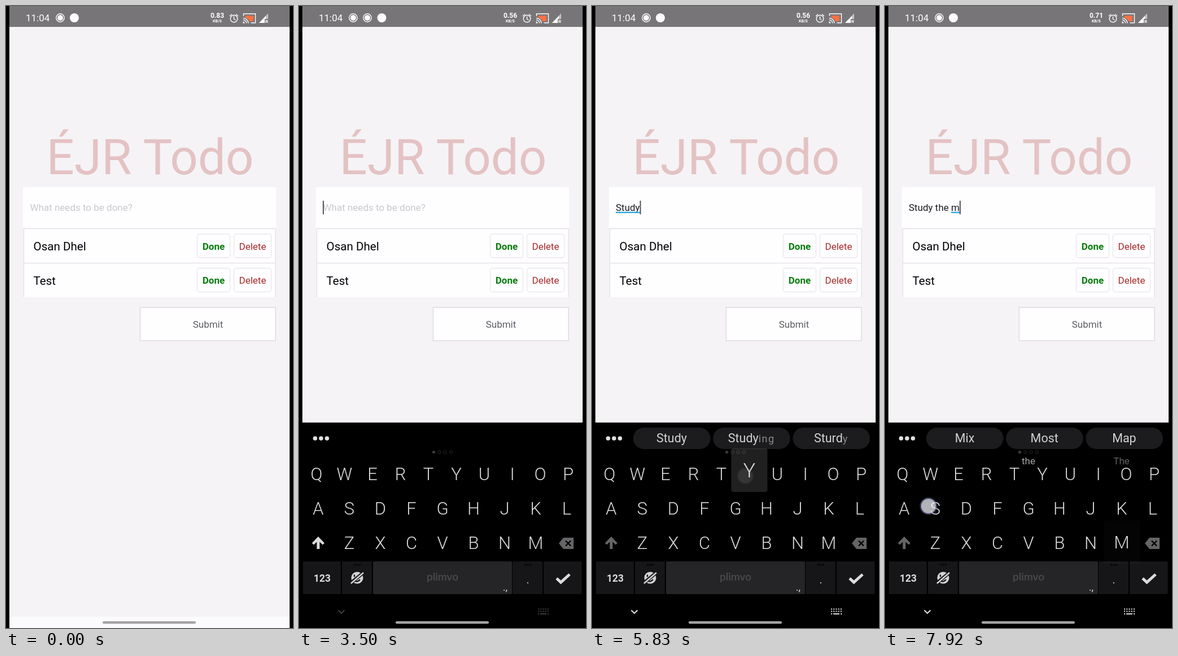
Animation of 508x1102 px, one loop 8 s. Source, as an HTML page:

```html
<!DOCTYPE html>
<html lang="en">
<head>
<meta charset="utf-8">
<title>Todo typing</title>
<style>
  html, body { margin: 0; width: 100%; height: 100%; overflow: hidden; background: #000; }
  svg { display: block; width: 508px; height: 1102px; font-family: Roboto, sans-serif; }
  text { white-space: pre; }
  .mid { text-anchor: middle; }
  .f17 { font-size: 17px; }
  .item { font-size: 20.6px; }
  .btn { fill: #fefdff; stroke: #e9e7eb; stroke-width: 1.3; }
  .done { font-weight: 700; fill: #087c0c; }
  .del { fill: #a52a2a; }
  .key { font-size: 31px; font-weight: 300; fill: #dcdcdc; }
  .pill { font-size: 21.5px; fill: #d2d2d4; }
  .rest { font-size: 18px; letter-spacing: 1.5px; fill: #8b8a8d; }
  .line { fill: none; stroke: #fff; stroke-width: 1.4; }
</style>
</head>
<body>
<svg viewBox="0 0 508 1102">
  <rect width="508" height="1102"/>
  <rect x="6" width="496" height="1102" fill="#f5f3f6"/>
  <rect x="6" width="496" height="37" fill="#777578"/>
  <rect x="6" y="1082" width="496" height="20" fill="#fbfafc"/>

  <g fill="#fff">
    <text x="35" y="27" font-size="17">11:04</text>
    <g id="rec"><circle class="line" cx="96" cy="21" r="7.2"/><circle cx="96" cy="21" r="5"/></g>
    <use id="rec2" href="#rec" x="25"/>
    <circle id="app" cx="121" cy="21" r="8"/>
    <text id="speed" class="mid" x="374" y="21" font-size="12" font-weight="700"></text>
    <text class="mid" x="374" y="28.5" font-size="7" font-weight="700">KB/S</text>
    <g class="line"><circle cx="403.5" cy="22.5" r="6.3"/><path d="M403.5 18.5V23l3 2M396 18l4-3.5M411 18l-4-3.5"/></g>
    <path d="M424 17h14v10h-7q-2-5-7-6z" fill="#ff7043"/>
    <path class="line" d="M420.500 18v-4.300h21v16h-8M420 21.500a9 9 0 0 1 9 9M420 24.800a5.700 5.700 0 0 1 5.700 5.700" stroke-width="1.6"/>
    <path d="M419.500 27.500a3 3 0 0 1 3 3h-3z"/>
    <path d="M448 30L464 13V23H458V30z" opacity=".55"/>
    <path d="M448 30L460 17.500V23H458V30z"/>
    <text x="459" y="30" font-size="8" font-weight="700">R</text>
  </g>

  <text class="mid" x="255" y="298" font-size="87" fill="#e4c2c3">ÉJR Todo</text>

  <rect x="30" y="321" width="448" height="72" fill="#fefdff"/>
  <text id="hint" class="f17" x="42.500" y="363" fill="#c9c8ca">What needs to be done?</text>
  <text id="typed" class="f17" x="42" y="363" fill="#1c1c1c"></text>
  <rect id="under" y="364.500" height="2.500" fill="#35abe2"/>
  <rect id="caret" y="345" width="2" height="24" fill="#555"/>

  <rect x="31" y="394" width="446" height="122" fill="#fefdff"/>
  <path d="M31.500 516V394.500H477V516M31 455.500H477" fill="none" stroke="#e6e4e8" stroke-width="1.5"/>
  <text class="item" x="48.500" y="433">Osan Dhel</text>
  <text class="item" x="48.500" y="494">Test</text>
  <g id="buttons" class="f17 mid">
    <rect class="btn" x="338.500" y="404" width="58" height="42" rx="4"/>
    <text class="done" x="367.500" y="431.500">Done</text>
    <rect class="btn" x="403.500" y="404" width="66" height="42" rx="4"/>
    <text class="del" x="436.500" y="431.500">Delete</text>
  </g>
  <use href="#buttons" y="60.500"/>
  <rect x="237.500" y="534" width="239.500" height="59" fill="#fefdff" stroke="#dedce0" stroke-width="1.5"/>
  <text class="f17 mid" x="357.500" y="570" fill="#5f5d61">Submit</text>

  <g id="board">
    <rect y="738" width="508" height="364"/>
    <g fill="#e0e0e0"><circle cx="28.500" cy="766" r="3.800"/><circle cx="39" cy="766" r="3.800"/><circle cx="49.500" cy="766" r="3.800"/></g>
    <g id="pills"></g>
    <g fill="none" stroke="#2c2b2d">
      <circle cx="238.500" cy="790.500" r="2.500" fill="#3c3b3d"/><circle cx="248.500" cy="790.500" r="2.700"/>
      <circle cx="258.500" cy="790.500" r="2.700"/><circle cx="269" cy="790.500" r="2.700"/>
    </g>
    <rect id="row" x="6" y="861" width="496" height="60" fill="#fff"/>
    <path id="shift" d="M34 940L45 951.500L42 954.500L36.500 949.500V962H31.500V949.500L26 954.500L23 951.500Z"/>
    <path d="M460 952L468 942H486V962H468Z" fill="#656466"/>
    <path d="M472 947.500l9 9M481 947.500l-9 9" stroke="#000" stroke-width="2.400"/>
    <g fill="#161517">
      <rect x="7" y="984" width="67" height="58" rx="2"/><rect x="76" y="984" width="53" height="58" rx="2"/>
      <rect x="378" y="984" width="53" height="58" rx="2"/><rect x="433" y="984" width="67.500" height="58" rx="2"/>
      <rect x="131" y="984" width="246" height="58" rx="2" fill="#252427"/>
    </g>
    <rect id="space" x="131" y="984" width="246" height="58" rx="2" fill="#fff"/>
    <g id="more" fill="#060606"><circle cx="98.500" cy="990" r="1.800"/><circle cx="103" cy="990" r="1.800"/><circle cx="107.500" cy="990" r="1.800"/></g>
    <use href="#more" x="302"/>
    <g class="mid" fill="#dcdcdc">
      <text x="41" y="1020" font-size="17.500" font-weight="700">123</text>
      <text x="254" y="1018" font-size="19" font-weight="600" fill="#4b4a4d" font-family="Lato, sans-serif">plimvo</text>
      <text x="365" y="1036" font-size="18">.,</text>
      <text x="405" y="1023" font-size="19">.</text>
    </g>
    <path d="M456 1014l7.500 7L479 1007" fill="none" stroke="#dcdcdc" stroke-width="5"/>
    <circle cx="103" cy="1013" r="10.500" fill="#d4d4d4"/>
    <g fill="none" stroke="#161517" stroke-width="2.300">
      <path d="M98 1007.500v4M107 1009v4M99 1019q5 2 9-3"/>
      <path d="M92 1022L114 1004" stroke-width="6"/>
      <path d="M92 1023L114 1004" stroke="#d4d4d4" stroke-width="2.600"/>
    </g>
    <g id="nav">
      <path d="M69.500 1070.500l5.500 5.500l5.500-5.500" fill="none" stroke="#eee" stroke-width="1.800"/>
      <path d="M423 1068.500h19M423 1072.500h19" stroke="#ddd" stroke-width="2.200" stroke-dasharray="2.200 2"/>
      <path d="M423 1077h2.200M427 1077h11M440 1077h2.200" stroke="#ddd" stroke-width="2.200"/>
    </g>
    <g id="keys"></g>
    <g id="fix" class="f17 mid"><text x="254" y="812" fill="#b4b4b6"></text><text x="418.500" y="812" fill="#717073"></text></g>
  </g>
  <rect x="171" y="1090" width="165" height="4.500" rx="2.200" fill="#a5a3a6"/>
  <g id="touch">
    <circle r="16" fill="#8f8fd0" opacity=".22"/>
    <circle r="13" fill="#fff" fill-opacity=".66" stroke="#8c96be" stroke-opacity=".55" stroke-width="2"/>
  </g>
</svg>
<script>
const LOOP = 8000, STEP = 1000 / 12;
const $ = id => document.getElementById(id);
const clamp = v => Math.max(0, Math.min(1, v));
const ramp = (t, from, span) => clamp((t - from) / span);
const show = (el, alpha) => el.setAttribute('opacity', alpha);

// Keyboard letters
const keys = {};
[['QWERTYUIOP', 31, 49.5, 828.5], ['ASDFGHJKL', 34, 55, 890], ['ZXCVBNM', 89, 55, 951]].forEach(([row, x0, gap, y]) =>
  [...row].forEach((ch, i) => {
    const x = x0 + gap * i;
    $('keys').insertAdjacentHTML('beforeend',
      `<g><rect x="-32" y="-38.5" width="64" height="77" rx="4" fill="#fff"/><text class="key mid" y="11">${ch}</text></g>`);
    keys[ch] = { x, y, el: $('keys').lastChild };
  }));
keys[' '] = { x: 250, y: 1003 };

// Finger contacts: [key or point, down, up]
const taps = [
  [{ x: 88, y: 353 }, 3070, 3200],
  ['S', 4500, 4620], ['T', 4790, 4890], ['U', 5080, 5200], ['D', 5390, 5480], ['Y', 5630, 5730],
  [' ', 5960, 6080], ['T', 6230, 6380], ['H', 6450, 6550], ['E', 6640, 6800], [' ', 7300, 7420],
  ['M', 7540, 7670], [{ x: 84, y: 882 }, 7860, 8100]
].map(([k, down, up]) => ({ ...(keys[k] || k), down, up, key: k }));

// Field states: [time, text, start of current word, suggestions, matched letters]
const states = [
  [-500, '', 0, ''], [3300, '', 0, ''],
  [4560, 'S', 0, 'So She Some', 1], [4850, 'St', 0, 'Still Start Stay', 2],
  [5140, 'Stu', 0, 'Stupid Stuff Study', 3], [5450, 'Stud', 0, 'Study Student Studied', 4],
  [5690, 'Study', 0, 'Study Studying Sturdy', 5], [6030, 'Study ', 6, 'and for Studying'],
  [6290, 'Study t', 6, 'and for Studying'], [6510, 'Study th', 6, 'that the this'],
  [6700, 'Study the', 6, 'that the then'], [7370, 'Study the ', 10, 'same first next'],
  [7600, 'Study the m', 10, 'Mix Most Map']
];
const fixes = [[6030, 'study', 'sturdy'], [7370, 'the', 'The']];

const pen = document.createElement('canvas').getContext('2d');
const width = s => { pen.font = '17px Roboto, sans-serif'; return pen.measureText(s).width; };

const pill = (word, i, n) => {
  const body = n ? `${word.slice(0, n)}<tspan class="rest">${word.slice(n)}</tspan>` : word;
  return `<rect x="${73 + 141.2 * i}" y="747" width="136.500" height="38" rx="19" fill="#1c1b1d"/>
    <text class="pill mid" x="${141 + 141.2 * i}" y="773">${body}</text>`;
};

let shown;
function drawField(t) {
  const state = states.filter(s => s[0] <= t).pop();
  const [since, text, start, words, match] = state;
  if (state !== shown) {
    shown = state;
    $('typed').textContent = text;
    $('pills').innerHTML = words ? words.split(' ').map((w, i) => pill(w, i, match)).join('') : '';
  }
  const from = 42 + width(text.slice(0, start)), to = 42 + width(text);
  show($('hint'), text ? 0 : 1);
  $('under').setAttribute('x', from);
  $('under').setAttribute('width', to - from);
  $('caret').setAttribute('x', to);
  show($('caret'), (t - since) % 1000 < 500 ? 1 : 0);
  $('shift').setAttribute('fill', text ? '#656466' : '#dcdcdc');
}

function drawKeys(t) {
  const lift = {};
  let finger = null, alpha = 0;
  for (const tap of taps) {
    const rise = ramp(t, tap.down + 20, 50);
    const p = rise * (1 - ramp(t, tap.up, 400)) ** 3;
    lift[tap.key] = Math.max(lift[tap.key] || 0, p);
    const a = ramp(t, tap.down - 20, 50) * (1 - ramp(t, tap.up, 120));
    if (a > alpha) { alpha = a; finger = tap; }
  }
  for (const ch in keys) {
    const { x, y, el } = keys[ch], p = lift[ch] || 0;
    if (!el) continue;
    el.setAttribute('transform', `translate(${x} ${y - 15 * p})`);
    show(el.firstChild, 0.31 * p);
    el.lastChild.setAttribute('transform', `scale(${1 + 0.38 * p})`);
  }
  show($('space'), 0.1 * lift[' ']);
  show($('touch'), alpha);
  if (finger) $('touch').setAttribute('transform', `translate(${finger.x - 7} ${finger.y + 4})`);
}

function drawFix(t) {
  const fix = fixes.filter(f => f[0] <= t).pop();
  const [a, b] = $('fix').children;
  show($('fix'), fix ? 1 : 0);
  show($('row'), fix ? 0.035 * (1 - ramp(t, fix[0] + 250, 200)) : 0);
  if (!fix) return;
  a.textContent = fix[1];
  b.textContent = fix[2];
  show(a, 1 - ramp(t, fix[0] + 500, 700));
  show(b, 1 - ramp(t, fix[0] + 500, 420));
}

function draw(t) {
  const extra = t >= 400 && t < 4800;
  show($('rec2'), extra ? 1 : 0);
  $('app').setAttribute('cx', extra ? 146.5 : 121);
  $('speed').textContent = t < 3000 ? '0.83' : t < 5950 ? '0.56' : '0.71';
  const open = 1 - (1 - ramp(t, 3310, 170)) ** 2;
  $('board').setAttribute('transform', `translate(0 ${364 * (1 - open)})`);
  show($('nav'), 0.27 + 0.73 * ramp(t, 3510, 250));
  drawField(t);
  drawKeys(t);
  drawFix(t);
}

function tick() {
  const t = performance.now() % LOOP;
  draw(Math.floor((t + 5) / STEP) * STEP);
  requestAnimationFrame(tick);
}
tick();
</script>
</body>
</html>
```
